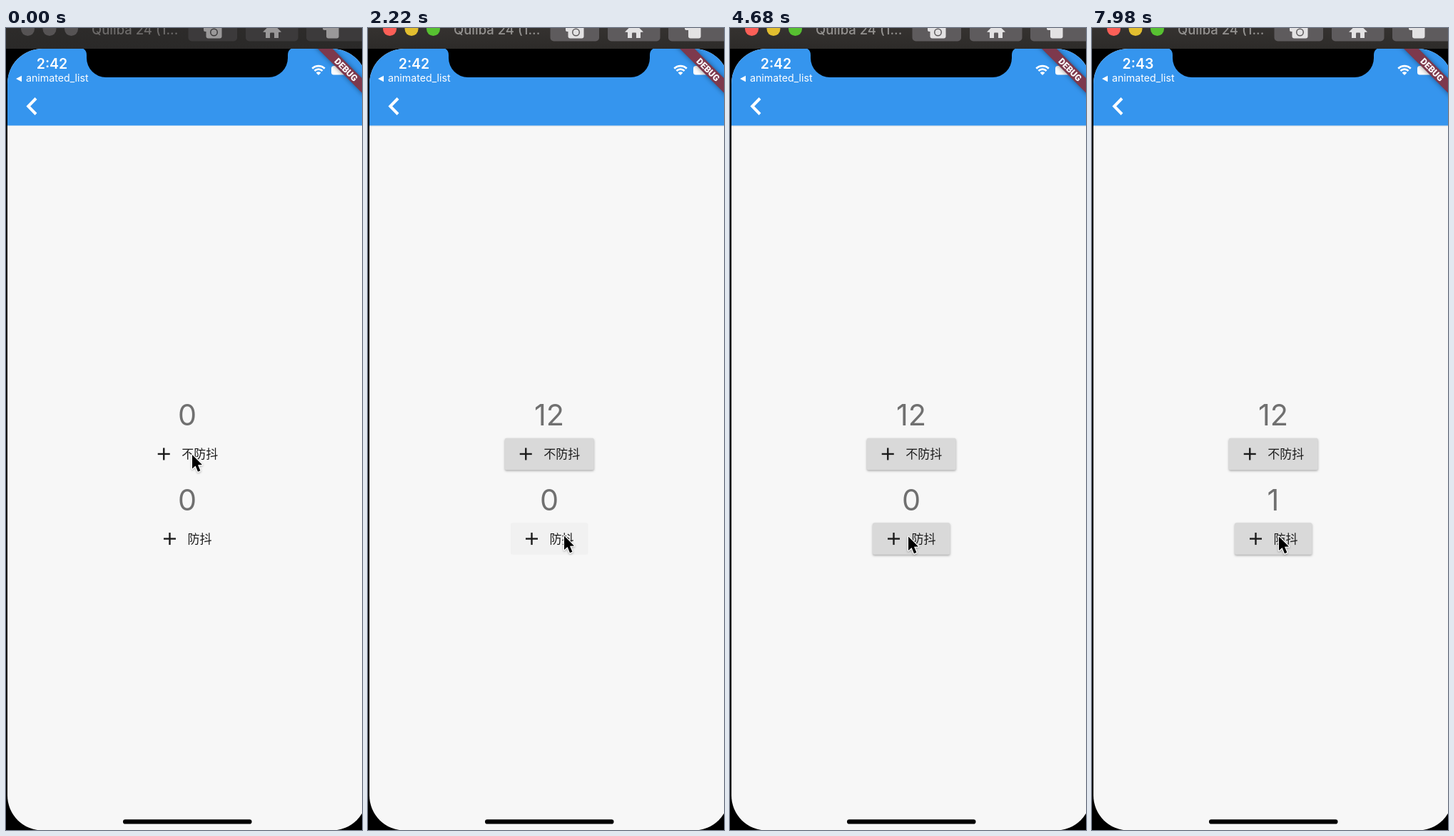
These frames come from a looping animation (499x1122 px, 8000 ms). An HTML page with a canvas:

```html
<!DOCTYPE html>
<html lang="zh-CN">
<head>
<meta charset="utf-8">
<title>Debounce demo</title>
<style>
html, body { margin: 0; width: 100%; height: 100%; overflow: hidden; background: #000; }
canvas { display: block; width: 499px; height: 1122px; }
</style>
</head>
<body>
<canvas id="stage" width="499" height="1122"></canvas>
<script>
const ctx = document.getElementById('stage').getContext('2d');
const LOOP = 8000, STEP = 60;
const UI = 'Inter, Roboto, sans-serif';
const CJK = '"Noto Sans CJK SC", "Noto Sans CJK", sans-serif';

// Each button receives a burst of taps; `first` is the first release.
const PERIOD = 150, HOLD = 80, FADE = 250;
const plainTaps = { first: 270, count: 12 };
const debouncedTaps = { first: 2750, count: 11 };
const DEBOUNCED_AT = 5240, CLOCK_AT = 5400;

// Pointer keys: time, x, y
const path = [
  [0, 261, 597], [900, 262, 597], [1920, 262, 597], [2180, 275, 710.5],
  [2280, 275, 710.5], [2580, 250, 711.5], [5280, 250, 711.5],
  [5760, 282, 710], [7140, 282, 710], [7500, 262, 711.5], [LOOP, 262, 711.5]
];

function pointerAt(t) {
  let i = 0;
  while (i < path.length - 2 && t >= path[i + 1][0]) i++;
  const [t0, x0, y0] = path[i], [t1, x1, y1] = path[i + 1];
  const u = (t - t0) / (t1 - t0), k = u * u * (3 - 2 * u);
  return [x0 + (x1 - x0) * k, y0 + (y1 - y0) * k];
}

function tapState(taps, t) {
  const start = taps.first - HOLD;
  const end = taps.first + (taps.count - 1) * PERIOD;
  const age = (t - start) % PERIOD;
  const active = t >= start && t < end;
  return {
    seen: t >= start,
    released: Math.max(0, Math.min(taps.count, Math.floor((t - taps.first) / PERIOD) + 1)),
    down: active && age < HOLD,
    age,
    glow: t < start ? 0 : t < end ? 1 : Math.max(0, 1 - (t - end) / FADE)
  };
}

function box(x, y, w, h, r, fill) {
  ctx.beginPath();
  ctx.roundRect(x, y, w, h, r);
  ctx.fillStyle = fill;
  ctx.fill();
}

function disc(x, y, r, fill) {
  ctx.beginPath();
  ctx.arc(x, y, r, 0, Math.PI * 2);
  ctx.fillStyle = fill;
  ctx.fill();
}

function poly(points, fill) {
  ctx.beginPath();
  points.forEach(([x, y]) => ctx.lineTo(x, y));
  ctx.closePath();
  ctx.fillStyle = fill;
  ctx.fill();
}

function label(str, x, y, font, fill, align = 'left') {
  ctx.font = font;
  ctx.textAlign = align;
  ctx.fillStyle = fill;
  ctx.fillText(str, x, y);
}

function shadow(color, blur, dy) {
  ctx.shadowColor = color;
  ctx.shadowBlur = blur;
  ctx.shadowOffsetY = dy;
}

function titleBar(active) {
  const bar = ctx.createLinearGradient(0, 0, 0, 29);
  bar.addColorStop(0, active ? '#353230' : '#2d2b2a');
  bar.addColorStop(1, active ? '#2d2b29' : '#2a2928');
  ctx.fillStyle = bar;
  ctx.fillRect(0, 0, 499, 29);
  const lights = active ? ['#fb5f57', '#e2be2f', '#57c131'] : ['#565354', '#565354', '#565354'];
  lights.forEach((c, i) => disc(30.5 + i * 30.5, 1.5, 9.5, c));
  label('Quilba 24 (1...', 120, 9, '500 18.5px ' + UI, active ? '#93918f' : '#6c6a69');

  const pill = active ? '#5e5b5d' : '#3c3a3b';
  const icon = active ? '#e3e2e3' : '#9a9899';
  [[255.5, 68.5], [336, 73.5], [421, 90]].forEach(([x, w]) => box(x, -12, w, 30.5, 5, pill));

  box(277, -8, 9, 13, 2, icon);
  box(280.5, -4, 22, 18.5, 3, icon);
  disc(291.5, 6, 5.5, pill);
  disc(291.5, 6, 4, icon);

  poly([[360, 5.5], [373, -7], [386, 5.5], [382, 6], [382, 14], [364, 14], [364, 6]], icon);
  box(370, 6.5, 6, 8, 1, pill);

  box(444, -8, 12, 11, 2, icon);
  box(449, -4, 17.5, 18.5, 3, icon);
}

function notch() {
  ctx.beginPath();
  ctx.moveTo(105, 28);
  ctx.quadraticCurveTo(113, 29, 113, 38);
  ctx.lineTo(113, 42);
  ctx.arcTo(113, 69, 140, 69, 27);
  ctx.lineTo(368, 69);
  ctx.arcTo(395, 69, 395, 42, 27);
  ctx.lineTo(395, 38);
  ctx.quadraticCurveTo(395, 29, 403, 28);
  ctx.fillStyle = '#000';
  ctx.fill();
}

function statusBar(t) {
  label(t < CLOCK_AT ? '2:42' : '2:43', 64.5, 57, '600 19.5px ' + UI, '#fff', 'center');
  poly([[14, 71], [22, 66.8], [22, 75.2]], '#fff');
  label('animated_list', 28, 75, '400 14.2px ' + UI, '#fff');

  ctx.strokeStyle = '#fff';
  ctx.lineWidth = 2.8;
  [12.3, 7.8].forEach(r => {
    ctx.beginPath();
    ctx.arc(438, 65.5, r, -Math.PI * 0.75, -Math.PI * 0.25);
    ctx.stroke();
  });
  ctx.beginPath();
  ctx.moveTo(438, 66);
  ctx.arc(438, 66, 4.8, -Math.PI * 0.75, -Math.PI * 0.25);
  ctx.fillStyle = '#fff';
  ctx.fill();
  box(456, 53, 26, 12.5, 3.5, '#fff');

  ctx.lineWidth = 4;
  ctx.beginPath();
  ctx.moveTo(42, 98.5);
  ctx.lineTo(31.2, 109.5);
  ctx.lineTo(42, 120.5);
  ctx.stroke();
}

function debugBanner() {
  ctx.save();
  ctx.translate(506, 29);
  ctx.rotate(Math.PI / 4);
  ctx.save();
  shadow('rgba(0,0,0,.45)', 7, 0);
  ctx.fillStyle = '#7d394d';
  ctx.fillRect(-60, 34.1, 120, 14.6);
  ctx.restore();
  label('DEBUG', 0, 45.8, '900 12.4px Roboto, Inter, sans-serif', '#fff', 'center');
  ctx.restore();
}

function button(text, width, y, tap, faint) {
  const x = 254.25 - width / 2, h = 44.5;
  if (tap.seen) {
    const shade = Math.round(217 - 20 * tap.glow);
    ctx.save();
    shadow(`rgba(0,0,0,${0.3 + 0.08 * tap.glow})`, 3 + 6 * tap.glow, 1.5 + 2 * tap.glow);
    box(x, y, width, h, 2.5, `rgb(${shade},${shade},${shade})`);
    ctx.restore();
  } else if (faint) {
    box(x, y, width, h, 2.5, '#f1f1f1');
  }
  return { x, y, width, h, text };
}

function ripple(b, tap, px, py) {
  if (!tap.down) return;
  ctx.save();
  ctx.beginPath();
  ctx.roundRect(b.x, b.y, b.width, b.h, 2.5);
  ctx.clip();
  disc(px - 1, py + 3, 31 + 0.4 * tap.age, 'rgba(0,0,0,.07)');
  ctx.restore();
}

function caption(b) {
  const px = b.x + 29.5, cy = b.y + 22.25;
  ctx.fillStyle = '#1c1c1c';
  ctx.fillRect(px - 8.5, cy - 1.2, 17, 2.4);
  ctx.fillRect(px - 1.2, cy - 8.5, 2.4, 17);
  label(b.text, b.x + 54.5, cy + 6.3, '500 17px ' + CJK, '#1c1c1c');
}

function pointer(x, y, down) {
  if (down) {
    ctx.beginPath();
    ctx.arc(x - 0.5, y + 2.7, 32.8, 0, Math.PI * 2);
    ctx.strokeStyle = '#000';
    ctx.lineWidth = 2.2;
    ctx.stroke();
  }
  ctx.save();
  ctx.translate(x, y);
  const arrow = [[0, 0], [0, 19.5], [4.6, 15.6], [8, 23.8], [11.4, 22.3], [8, 14.3], [14, 14]];
  ctx.beginPath();
  arrow.forEach(([ax, ay]) => ctx.lineTo(ax, ay));
  ctx.closePath();
  ctx.lineJoin = 'round';
  ctx.lineWidth = 2.4;
  ctx.strokeStyle = '#fff';
  shadow('rgba(0,0,0,.3)', 3, 1);
  ctx.stroke();
  shadow('transparent', 0, 0);
  ctx.fillStyle = '#000';
  ctx.fill();
  ctx.restore();
}

function draw(t) {
  const awake = t >= STEP;
  const [px, py] = pointerAt(t);
  const plain = tapState(plainTaps, t);
  const debounced = tapState(debouncedTaps, t);

  ctx.fillStyle = '#000';
  ctx.fillRect(0, 0, 499, 1122);
  titleBar(awake);

  ctx.save();
  ctx.beginPath();
  ctx.roundRect(2, 29, 504, 1093.5, 49);
  ctx.clip();
  ctx.fillStyle = '#f7f7f7';
  ctx.fillRect(0, 29, 499, 1093);
  if (awake) {
    ctx.fillStyle = '#e9eaeb';
    ctx.fillRect(0, 136, 499, 2);
  }
  ctx.fillStyle = '#3595ee';
  ctx.fillRect(0, 29, 499, 107.5);
  notch();
  statusBar(t);
  debugBanner();

  const digits = '400 41.4px ' + UI;
  label(plain.released, 254, 556, digits, '#707070', 'center');
  label(t < DEBOUNCED_AT ? 0 : 1, 254, 674.5, digits, '#707070', 'center');

  const top = button('不防抖', 125, 573.7, plain, false);
  const bottom = button('防抖', 108.5, 692.3, debounced, awake);
  ripple(top, plain, px, py);
  ripple(bottom, debounced, px, py);
  caption(top);
  caption(bottom);

  box(164, 1107.3, 180.5, 6.2, 3.1, '#000');
  ctx.restore();
  pointer(px, py, plain.down || debounced.down);
}

function tick() {
  const t = performance.now() % LOOP;
  draw(Math.floor(t / STEP) * STEP);
  requestAnimationFrame(tick);
}
tick();
</script>
</body>
</html>
```
